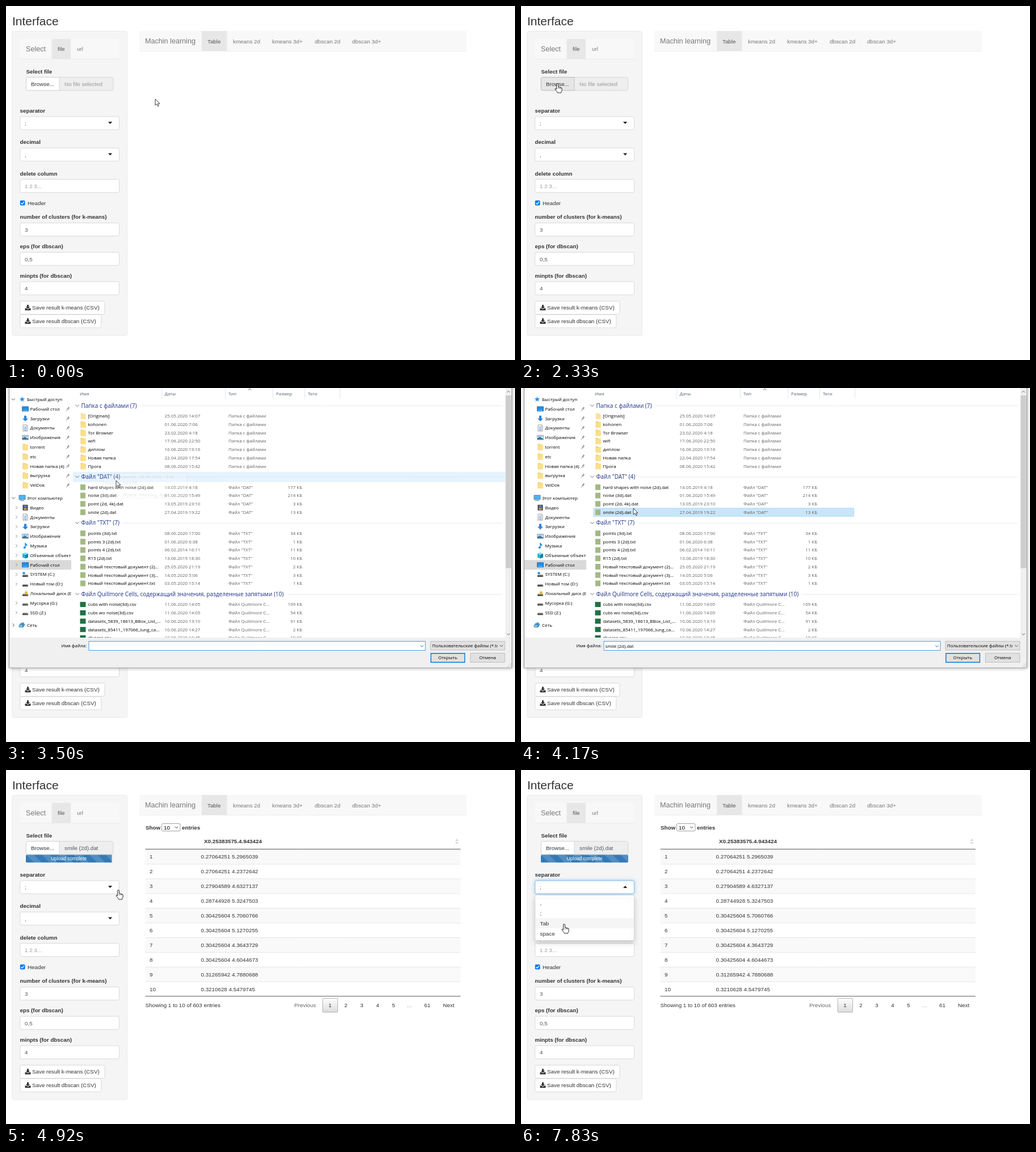
An HTML page with a canvas for the animation above (8000 ms loop, 897 by 624 pixels).

```html
<!DOCTYPE html>
<html lang="en">
<head>
<meta charset="utf-8">
<title>Clustering interface</title>
<style>
html, body { margin: 0; width: 897px; height: 624px; overflow: hidden; background: #fff; }
canvas { display: block; }
</style>
</head>
<body>
<canvas id="stage" width="897" height="624"></canvas>
<script>
const LOOP = 8000, STEP = 250 / 3;
const HAIR = 0.7;
const WEB = '"Liberation Sans", Arial, sans-serif';
const UI = '"Open Sans", "Noto Sans", sans-serif';
const stage = document.getElementById('stage').getContext('2d');
const layer = document.createElement('canvas');
layer.width = 897;
layer.height = 624;
const overlay = layer.getContext('2d');
let g = stage;

// ---- helpers: boxes take corner coordinates, text takes its middle height
const clamp = v => Math.max(0, Math.min(1, v));
const ramp = (t, a, b) => clamp((t - a) / (b - a));
const inside = (p, x0, y0, x1, y1) => p.x >= x0 && p.x <= x1 && p.y >= y0 && p.y <= y1;

function box(x0, y0, x1, y1, fill, stroke, radius = 0, width = HAIR) {
  g.beginPath();
  g.roundRect(x0, y0, x1 - x0, y1 - y0, radius);
  if (fill) { g.fillStyle = fill; g.fill(); }
  if (stroke) { g.strokeStyle = stroke; g.lineWidth = width; g.stroke(); }
}

function poly(points, fill, stroke, width = 1, closed = true) {
  g.beginPath();
  for (let i = 0; i < points.length; i += 2) g.lineTo(points[i], points[i + 1]);
  if (closed) g.closePath();
  if (fill) { g.fillStyle = fill; g.fill(); }
  if (stroke) { g.strokeStyle = stroke; g.lineWidth = width; g.stroke(); }
}

const line = (x0, y0, x1, y1, color, width = HAIR) => poly([x0, y0, x1, y1], null, color, width, false);

function write(font, s, x, y, color, size, weight, align) {
  g.font = `${weight} ${size}px ${font}`;
  g.textAlign = align;
  g.fillStyle = color;
  g.fillText(s, x, y + size * 0.36);
}
const web = (s, x, y, color = '#333', size = 9.8, weight = 'normal', align = 'left') =>
  write(WEB, s, x, y, color, size, weight, align);
const bold = (s, x, y) => web(s, x, y, '#333', 9.8, 'bold');
const ui = (s, x, y, color = '#000', size = 7.95, align = 'left') =>
  write(UI, s, x, y, color, size, 'normal', align);

function clipped(x0, y0, x1, y1, draw) {
  g.save();
  g.beginPath();
  g.rect(x0, y0, x1 - x0, y1 - y0);
  g.clip();
  draw();
  g.restore();
}

function at(x, y, draw) {
  g.save();
  g.translate(x, y);
  draw();
  g.restore();
}

const chevron = (x, y, r, color, turn = 0) => at(x, y, () => {
  g.rotate(turn);
  poly([-r, -r / 2, 0, r / 2, r, -r / 2], null, color, 0.9, false);
});

// ---- web page
const field = (y, value, color = '#555', x = 33) => {
  box(24.7, y, 199.5, y + 23.1, '#fff', '#ccc', 2.8);
  web(value, x, y + 11.8, color);
};

function caret(y, up) {
  const d = up ? -2 : 2;
  poly([180, y - d, 187.2, y - d, 183.6, y + d], '#222');
}

function saveButton(y, right, label) {
  box(24.7, y, right, y + 23.1, '#fff', '#ccc', 2.8);
  const m = y + 11.5;
  poly([37, m - 5, 40, m - 5, 40, m - 1.6, 42.2, m - 1.6, 38.5, m + 2, 34.8, m - 1.6, 37, m - 1.6], '#333');
  poly([33.5, m + 1, 36.2, m + 1, 38.5, m + 3, 40.8, m + 1, 43.5, m + 1, 43.5, m + 4.6, 33.5, m + 4.6], '#333');
  web(label, 46, m);
}

function progress(share) {
  const x0 = 35, y0 = 149.3, y1 = 163.3, w = 154 * share;
  box(x0, y0, 189, y1, '#f1f1f1', null, 2);
  clipped(x0, y0, x0 + w, y1, () => {
    box(x0, y0, 189, y1, '#337ab7', null, 2);
    for (let x = x0 - 28; x < 190; x += 28)
      poly([x, y0, x + 14, y0, x + 28, y0 + 14, x + 14, y0 + 14], 'rgba(255,255,255,.15)');
    web('Upload complete', x0 + w / 2, 156.3, '#fff', 8.4, 'normal', 'center');
  });
}

const ROWS = ['0.27064251 5.2965039', '0.27064251 4.2372642', '0.27904589 4.6327137',
  '0.28744928 5.3247503', '0.30425604 5.7060766', '0.30425604 5.1270255', '0.30425604 4.3643729',
  '0.30425604 4.6044673', '0.31265942 4.7880688', '0.3210628 4.5479745'];

function table() {
  bold('Show', 246, 101);
  box(274.5, 94.5, 307, 107.5, '#fff', '#767676', 2);
  web('10', 278, 101, '#000');
  chevron(300.5, 101.2, 2.6, '#222');
  bold('entries', 310, 101);
  bold('X0.25383575.4.943424', 349, 125.5);
  poly([791.5, 125, 797.5, 125, 794.5, 121], '#d8d8d8');
  poly([791.5, 127, 797.5, 127, 794.5, 131], '#d8d8d8');
  ROWS.forEach((row, i) => {
    const y = 139.8 + 25.9 * i;
    if (i % 2 === 0) box(245.5, y, 801, y + 25.9, '#f9f9f9');
    if (i) line(245.5, y + 0.35, 801, y + 0.35, '#ddd');
    web(i + 1, 253, y + 13.1);
    web(row, 343.5, y + 13.1);
  });
  line(245.5, 139.5, 801, 139.5, '#111');
  line(245.5, 398.8, 801, 398.8, '#111');
  web('Showing 1 to 10 of 603 entries', 245.5, 414);
  web('Previous', 508, 414.5, '#666');
  const shade = g.createLinearGradient(0, 402, 0, 427);
  shade.addColorStop(0, '#fff');
  shade.addColorStop(1, '#dcdcdc');
  box(558, 402.5, 584.5, 427, shade, '#979797', 1.5);
  ['1', '2', '3', '4', '5', '…', '61'].forEach((s, i) =>
    web(s, i < 6 ? 571 + 28 * i : 742.5, 414.5, s === '…' ? '#888' : '#333', 9.8, 'normal', 'center'));
  web('Next', 770, 414.5);
}

function dropdown(pointer) {
  g.save();
  g.shadowColor = 'rgba(102,175,233,.6)';
  g.shadowBlur = 6;
  box(24.7, 195, 199.5, 218.1, '#fff', '#66afe9', 2.8);
  g.shadowColor = 'rgba(0,0,0,.18)';
  g.shadowBlur = 9;
  g.shadowOffsetY = 4;
  box(24.7, 220.5, 199.5, 300.5, '#fff', '#ccc', 2.8);
  g.restore();
  web(';', 33, 206.8, '#555');
  caret(206, true);
  const active = pointer.y < 261 ? 1 : 2;
  box(25, 225 + 18 * active, 199, 243 + 18 * active, '#f5f5f5');
  [',', ';', 'Tab', 'space'].forEach((s, i) => web(s, 33.5, 234 + 18 * i));
}

function page(t, pointer) {
  box(0, 0, 897, 624, '#fff');
  web('Interface', 11, 26, '#333', 21);
  box(11, 44.4, 213.5, 581, '#f5f5f5', '#e3e3e3', 2.8);

  box(24.5, 58, 200, 93.2, '#f8f8f8');
  line(24.5, 93.5, 200, 93.5, '#e7e7e7');
  box(80.5, 58, 114, 93.2, '#e7e7e7');
  web('Select', 35, 75.5, '#777', 12.6);
  web('file', 91, 75.8, '#555');
  web('url', 125, 75.8, '#777');

  const uploaded = t > 4410;
  const hover = inside(pointer, 35, 125, 94, 149);
  bold('Select file', 35.5, 115);
  box(35.4, 125.7, 188.8, 148.8, '#eee', '#ccc', 2.8);
  box(35.4, 125.7, 93.9, 148.8, hover ? '#e6e6e6' : '#fff', hover ? '#adadad' : '#ccc', [2.8, 0, 0, 2.8]);
  web('Browse...', 44, 137.3);
  web(uploaded ? 'smile (2d).dat' : 'No file selected', 103, 137.3, uploaded ? '#555' : '#999');
  if (uploaded) progress(1 - (1 - ramp(t, 4417, 5017)) ** 2.3);

  bold('separator', 24.5, 184);
  field(195, ';');
  caret(206);
  bold('decimal', 24.5, 239.5);
  field(250.3, ',');
  caret(261.4);
  bold('delete column', 24.5, 295);
  field(305.6, '1 2 3...', '#999');
  box(24.8, 342.8, 33.6, 351.4, '#0075ff', null, 1.7);
  poly([26.6, 347.2, 28.5, 349.2, 32, 344.9], null, '#fff', 1.4, false);
  web('Header', 38, 347);
  bold('number of clusters (for k-means)', 24.5, 371);
  field(382.4, '3');
  bold('eps (for dbscan)', 24.5, 423);
  field(434.2, '0,5');
  bold('minpts (for dbscan)', 24.5, 475);
  field(486, '4');
  saveButton(520.3, 174, 'Save result k-means (CSV)');
  saveButton(544.1, 167.8, 'Save result dbscan (CSV)');

  box(235, 44, 812, 79.2, '#f8f8f8');
  line(235, 79.5, 812, 79.5, '#e7e7e7');
  box(345, 44, 389.5, 79.2, '#e7e7e7');
  web('Machin learning', 245, 61.5, '#777', 12.6);
  web('Table', 355, 62, '#555');
  web('kmeans 2d', 400, 62, '#777');
  web('kmeans 3d+', 469, 62, '#777');
  web('dbscan 2d', 544, 62, '#777');
  web('dbscan 3d+', 610, 62, '#777');

  if (t > 4740) table();
  if (t > 7240) dropdown(pointer);
}

// ---- file dialog: icons are centred on the origin
const sheet = () => {
  poly([-4, -5.5, 2, -5.5, 4, -3.5, 4, 5.5, -4, 5.5], '#fff', '#8a8a8a', 0.8);
  poly([2, -5.5, 2, -3.5, 4, -3.5], null, '#8a8a8a', 0.6, false);
};
const drive = () => {
  poly([-4, 0, 4, 0, 5, 1.5, -5, 1.5], '#b9b9b9');
  box(-5, 1.5, 5, 4.5, '#4e4e4e', null, 0.6);
  box(2.5, 2.5, 4, 3.5, '#5fd35f');
};
const ICONS = {
  star() {
    const p = [];
    for (let i = 0; i < 10; i++) {
      const r = i % 2 ? 2.1 : 5, a = i * Math.PI / 5;
      p.push(r * Math.sin(a), -r * Math.cos(a));
    }
    poly(p, '#2f8fdd');
  },
  desk() { box(-5.5, -4, 5.5, 4, '#1e90e8', '#1565b0', 0, 0.8); box(-4, 2, 4, 3.4, '#5bb8ff'); },
  down() { poly([-2, -5, 2, -5, 2, 0, 5, 0, 0, 5, -5, 0, -2, 0], '#2f83d6'); },
  doc() {
    sheet();
    for (const y of [-2, 0, 2, 4]) line(-2.5, y, 2.5, y, '#4b86c2', 0.8);
  },
  pic() { box(-5.5, -4, 5.5, 4, '#e9f4fb', '#8a9aa8', 0, 0.8); poly([-5, 3.5, -5, 1, -1, -1, 5, 2, 5, 3.5], '#3d6f94'); box(-4.5, -3, 4.5, -1, '#7cbcea'); },
  folder() { poly([-4.5, -5.5, -0.5, -5.5, 0.5, -4.3, 4.5, -4.3, 4.5, 5.5, -4.5, 5.5], '#f3cf68'); box(-3.6, -3.6, 4.5, 5.5, '#fbdf8d'); },
  pc() { box(-5.5, -5, 5.5, 2.5, '#4db5f2', '#3f6f92', 0, 0.8); box(-3.5, 4, 3.5, 5, '#5d7585'); },
  film() { box(-4.5, -5, 4.5, 5, '#3a3f48'); box(-2.6, -4, 2.6, -0.5, '#5b85c4'); box(-2.6, 0.5, 2.6, 4, '#c9a063'); },
  note() { line(0, -5, 0, 3, '#1e88d8', 1.5); poly([0, -5, 3.5, -1.5, 3, 1, 0, -2], '#1e88d8'); box(-3.4, 1.4, 0.7, 5, '#1e88d8', null, 2); },
  cube() { poly([-5, -3, 0, -5, 5, -3, 5, 3.5, 0, 5.5, -5, 3.5], '#27b4d8'); poly([0, -1, 5, -3, 5, 3.5, 0, 5.5], '#1382a8'); poly([-5, -3, 0, -5, 5, -3, 0, -1], '#8fe3f2'); },
  drive,
  system() { drive(); box(-4.5, -4, -0.5, -0.5, '#1e90e8'); },
  locked() { drive(); box(-1, -3, 4, 1, '#e5b93c', null, 0.8); box(0.3, -5, 2.7, -2.5, null, '#e5b93c', 1); },
  net() { poly([-4, -3, 2, -5, 5, -1, 2, 4, -3, 4], '#3f97d3'); box(-5.5, -0.5, 1, 3.5, '#7cc8f5', '#2f6d99', 0, 0.7); },
  sheet,
  text() { box(-5, -5, 4, 5, '#a3b985'); },
  cells() { box(-5.5, -4.5, 4.5, 4.5, '#1e7145'); },
};

const QUICK = ['star|Быстрый доступ', 'desk|Рабочий стол', 'down|Загрузки', 'doc|Документы', 'pic|Изображения',
  'folder|torrent', 'folder|etc', 'folder|Новая папка (4)', 'folder|выгрузка', 'folder|VelDok'];
const COMPUTER = ['pc|Этот компьютер', 'film|Видео', 'doc|Документы', 'down|Загрузки', 'pic|Изображения',
  'note|Музыка', 'cube|Объемные объекты', 'desk|Рабочий стол', 'system|SYSTEM (C:)', 'drive|Новый том (D:)',
  'locked|Локальный диск (E:)', 'drive|Мусорка (G:)', 'drive|SSD (Z:)'];

function navSection(items, top, pointer, arrows, pinned) {
  items.forEach((item, i) => {
    const [icon, label] = item.split('|'), y = top + 16.82 * i;
    if (!pinned && i === 7) box(6, y - 8.4, 115, y + 8.4, '#d9d9d9');
    else if (arrows && inside(pointer, 6, y - 8.4, 115, y + 8.3)) box(6, y - 8.4, 115, y + 8.4, '#e5f3ff');
    at(i ? 34 : 28.5, y, ICONS[icon]);
    ui(label, i ? 42.5 : 37, y);
    if (pinned && i) {
      line(106, y + 3.5, 108.5, y + 1, '#777', 0.9);
      poly([107, y - 0.5, 110.2, y + 2.5, 110, y, 112.3, y - 1.5, 110, y - 3.8, 108.8, y - 1.3], '#9a9a9a');
    }
    g.globalAlpha = arrows;
    if (!i) chevron(13, y, 2.9, '#404040', items.length > 1 ? 0 : -Math.PI / 2);
    else if (!pinned && icon !== 'locked') chevron(18.5, y, 2.9, '#8a8a8a', -Math.PI / 2);
    g.globalAlpha = 1;
  });
}

const CSV_ROWS = ['cubs with noise(3d).csv|11.06.2020 14:05|109 КБ', 'cubs wo noise(3d).csv|11.06.2020 14:05|54 КБ',
  'datasets_5839_18613_BBox_List_...|10.06.2020 13:10|91 КБ', 'datasets_85411_197066_lung_ca...|10.06.2020 14:27|2 КБ',
  'divorce.csv|10.06.2020 10:45|19 КБ'];
const HARD = 'hard shapes with noise (2d).dat|14.05.2019 4:18|177 КБ';
const CSV_TITLE = 'Файл Quillmore Cells, содержащий значения, разделенные запятыми';
const CSV_TYPE = 'Файл Quillmore C...';
const group = (title, count, type, icon, rows) => ({ title: `${title} (${count})`, type, icon, rows });

const LOADING = [
  group('Файл "DAT"', 1, 'Файл "DAT"', 'text', [HARD]),
  group(CSV_TITLE, 5, CSV_TYPE, 'sheet', CSV_ROWS),
  group('Ярлык Интернета', 1, 'Ярлык Интернета', 'sheet', ['Gloomrook|27.05.2020 12:50|1 КБ']),
];
const LOADED = [
  group('Папка с файлами', 7, 'Папка с файлами', 'folder', ['[Originals]|25.05.2020 14:07', 'kohonen|01.06.2020 7:06',
    'Tor Browser|23.02.2020 4:18', 'wifi|17.06.2020 22:50', 'диплом|16.06.2020 19:16',
    'Новая папка|22.04.2020 17:54', 'Прога|08.06.2020 15:42']),
  group('Файл "DAT"', 4, 'Файл "DAT"', 'text', [HARD, 'noise (3d).dat|01.06.2020 15:49|214 КБ',
    'point (2d, 4k).dat|13.05.2019 23:10|3 КБ', 'smile (2d).dat|27.04.2019 19:22|13 КБ']),
  group('Файл "TXT"', 7, 'Файл "TXT"', 'text', ['points (3d).txt|08.06.2020 17:00|34 КБ',
    'points 3 (2d).txt|01.06.2020 6:38|1 КБ', 'points 4 (2d).txt|06.02.2014 16:11|11 КБ',
    'R15 (2d).txt|13.06.2019 18:30|10 КБ', 'Новый текстовый документ (2)...|25.05.2020 21:19|2 КБ',
    'Новый текстовый документ (3)...|14.05.2020 5:06|3 КБ', 'Новый текстовый документ.txt|03.05.2020 15:14|1 КБ']),
  group(CSV_TITLE, 10, CSV_TYPE, 'cells', CSV_ROWS),
];

function fileList(groups, pointer, selected) {
  let y = 31;
  for (const { title, type, icon, rows } of groups) {
    if (inside(pointer, 118, y - 9, 880, y + 9)) box(118, y - 8.7, 880, y + 9.3, '#e5f3ff');
    chevron(125.5, y, 3.2, '#555');
    ui(title, 132.5, y, '#1e3287', 10);
    line(138.5 + g.measureText(title).width, y + 0.5, 875, y + 0.5, '#e0e0e0');
    y += 18.5;
    for (const row of rows) {
      const [name, date, size = ''] = row.split('|');
      if (selected && name.startsWith('smile')) box(128, y - 7.2, 586.5, y + 7.3, '#c9e6f8', '#99d1ff');
      else if (inside(pointer, 128, y - 7.3, 586, y + 7.3)) box(128, y - 7.3, 586.5, y + 7.3, '#e5f3ff');
      g.globalAlpha = name[0] === '[' ? 0.5 : 1;
      at(136, y, ICONS[icon]);
      g.globalAlpha = 1;
      ui(name, 144.5, y);
      ui(date, 279.5, y, '#606060');
      ui(type, 392, y, '#606060');
      ui(size, 522, y, '#606060', 7.95, 'right');
      y += 14.7;
    }
    y += 4;
  }
}

function tooltip(alpha) {
  g.globalAlpha = alpha;
  box(171.5, 150.5, 319, 194, '#fff', '#999');
  ui('Дата создания: 08.06.2020 15:42', 174, 156.5, '#575757');
  ui('Размер: 849 КБ', 174, 167, '#575757');
  ui('Файлы: .RData, .Rhistory, Зад...', 174, 188, '#575757');
  g.globalAlpha = 1;
}

function dialog(t, pointer) {
  const loaded = t > 2900, selected = t > 4070;
  g.clearRect(0, 0, 897, 624);
  g.save();
  g.shadowColor = 'rgba(0,0,0,.3)';
  g.shadowBlur = 6;
  g.shadowOffsetY = 1;
  box(5.5, -8, 891.5, 493, '#fff', '#777');
  g.restore();
  box(6, 440, 891, 492.5, '#f0f0f0');

  clipped(6, 0, 115, 440, () => {
    const arrows = 1 - ramp(t, 3500, 4080);
    navSection(QUICK, 20, pointer, arrows, true);
    navSection(COMPUTER, 194, pointer, arrows);
    navSection(['net|Сеть'], 418, pointer, arrows);
  });

  for (const x of [275, 387, 471, 527, 589]) line(x - 0.5, 0, x - 0.5, 19, '#dcdcdc');
  [['Имя', 130], ['Даты', 279.5], ['Тип', 392], ['Размер', 476], ['Теги', 532]]
    .forEach(([s, x]) => ui(s, x, 10, '#4c607a'));
  chevron(429.5, 2.5, 2.8, '#555', Math.PI);

  clipped(118, 19, 880, 440, () => {
    fileList(loaded ? LOADED : LOADING, pointer, selected);
    if (t > 3320 && t < 3570) tooltip(t < 3490 ? 0.9 : 0.17);
  });

  box(880, loaded ? 0 : 13, 891, loaded ? 440 : 428, '#f0f0f0');
  box(880.5, 13, 890.5, 317.5, '#cdcdcd');
  if (loaded) {
    chevron(885.5, 6.5, 2.6, '#505050', Math.PI);
    chevron(885.5, 434, 2.6, '#505050');
  }

  ui('Имя файла:', 142, 454.5, '#000', 7.95, 'right');
  box(146, 446.5, 739, 462.5, '#fff', '#0078d7');
  chevron(733, 455, 2.8, '#444');
  if (selected) ui('smile (2d).dat', 148.5, 455);
  else if ((t - 2580 + 1060) % 1060 < 530) line(149, 449.5, 149, 459.5, '#000');
  box(748, 446.5, 879, 462, '#e1e1e1', '#adadad');
  clipped(749, 447, 866, 462, () => ui('Пользовательские файлы (*.text)', 751, 454.5));
  chevron(873, 454.5, 2.8, '#444');
  box(748.8, 467.8, 808.5, 483.5, '#e1e1e1', '#0078d7', 0, 1.4);
  ui('Открыть', 778.5, 475.5, '#000', 7.95, 'center');
  box(818.5, 467.5, 879, 483.5, '#e1e1e1', '#adadad');
  ui('Отмена', 848.7, 475.5, '#000', 7.95, 'center');
  for (let i = 0; i < 3; i++)
    for (let j = 0; j <= i; j++) box(889 - 2.5 * j, 485 + 2.5 * i, 890.2 - 2.5 * j, 486.2 + 2.5 * i, '#b5b5b5');
}

// ---- pointer: time, x, y
const PATH = [[0, 263, 164], [590, 263, 164], [1250, 63, 138], [1420, 63, 138], [1500, 64, 137], [2820, 64, 137],
  [3080, 170, 135], [3330, 172, 136], [3500, 194, 163], [4000, 198, 212], [5250, 198, 212], [5600, 330, 137],
  [6080, 411, 232], [6480, 340, 341], [6920, 87, 205], [7000, 87, 201], [7420, 87, 201], [7830, 76, 272], [8001, 76, 272]];

function pointerAt(t) {
  const i = PATH.findIndex(p => p[0] > t);
  const [t0, x0, y0] = PATH[i - 1], [t1, x1, y1] = PATH[i];
  const p = ramp(t, t0, t1), k = p * p * (3 - 2 * p);
  return { x: x0 + (x1 - x0) * k, y: y0 + (y1 - y0) * k };
}

const ARROW = [0, 0, 0, 11, 2.6, 8.7, 4.5, 12.8, 6.4, 12, 4.6, 8.1, 8, 8.1];

function hand() {
  g.beginPath();
  g.moveTo(-1.4, 10);
  g.lineTo(-1.4, 1);
  g.quadraticCurveTo(-1.2, -0.5, 0, -0.5);
  g.quadraticCurveTo(1.4, -0.5, 1.4, 1);
  g.lineTo(1.4, 5.6);
  g.quadraticCurveTo(3.7, 4.8, 3.9, 6.5);
  g.quadraticCurveTo(6, 5.7, 6.2, 7.3);
  g.quadraticCurveTo(8, 6.7, 8.2, 8.3);
  g.lineTo(8.2, 11);
  g.quadraticCurveTo(8, 13.5, 6.8, 14.6);
  g.lineTo(6.8, 16);
  g.lineTo(0.6, 16);
  g.quadraticCurveTo(-0.5, 13.5, -3.6, 10.4);
  g.quadraticCurveTo(-4.6, 8.6, -3, 8.4);
  g.closePath();
  g.fillStyle = '#fff';
  g.fill();
  g.strokeStyle = '#111';
  g.lineWidth = 0.9;
  g.stroke();
  for (const x of [1.4, 3.9, 6.2]) line(x, 6.5, x, 9, '#111');
}

function drawPointer(t, pointer) {
  const inDialog = t > 2340 && t < 4325;
  const clickable = inDialog ? t < 2900
    : inside(pointer, 35, 125, 94, 149) || inside(pointer, 24, 195, 200, t > 7240 ? 301 : 219);
  at(pointer.x, pointer.y, clickable ? hand : () => poly(ARROW, '#fff', '#111', 0.8));
}

function render(t) {
  const pointer = pointerAt(t);
  page(t, pointer);
  const shown = ramp(t, 2340, 2560) * (1 - ramp(t, 4180, 4325));
  if (shown) {
    g = overlay;
    dialog(t, pointer);
    g = stage;
    g.globalAlpha = shown;
    g.drawImage(layer, 0, 0);
    g.globalAlpha = 1;
  }
  drawPointer(t, pointer);
}

const start = performance.now();
function tick() {
  const t = (performance.now() - start) % LOOP;
  render(Math.floor((t + 5) / STEP) * STEP);
  requestAnimationFrame(tick);
}
tick();
</script>
</body>
</html>
```
